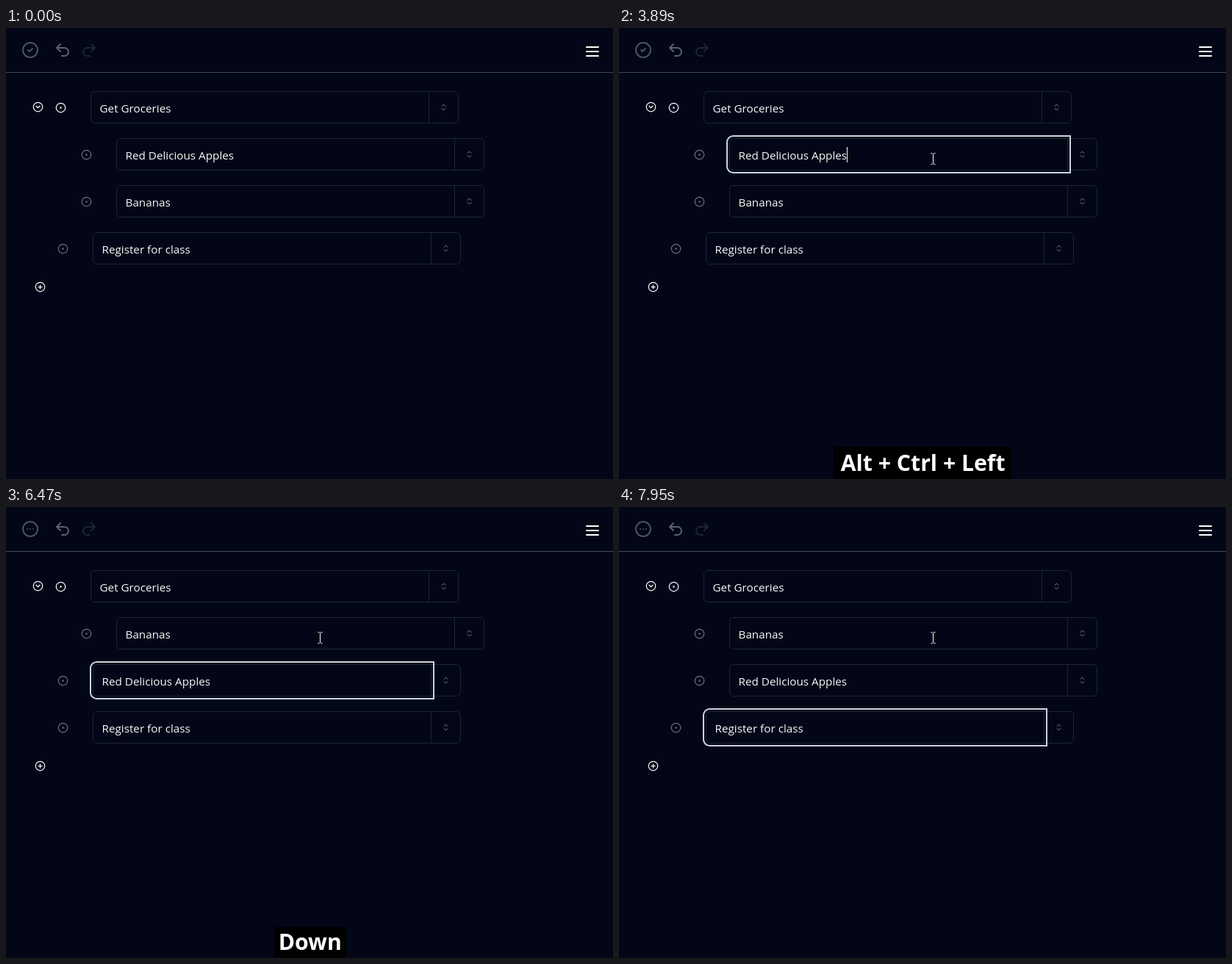
These frames come from a looping animation (826x614 px, 8 s). An HTML page:

```html
<!DOCTYPE html>
<html lang="en">
<head>
<meta charset="utf-8">
<title>Outline list</title>
<style>
  html, body { margin: 0; width: 100%; height: 100%; overflow: hidden; background: #020617; }
  svg { display: block; }
  text { font: 15.25px "Open Sans", "Noto Sans", sans-serif; fill: #f8fafc; white-space: pre; }
  .keys { font-size: 30.2px; font-weight: 700; fill: #fff; text-anchor: middle; }
  .icon { fill: none; stroke-width: 2; stroke-linecap: round; stroke-linejoin: round; }
</style>
</head>
<body>
<svg id="stage" width="826" height="614" viewBox="0 0 826 614"></svg>
<script>
const LOOP = 8000, BG = '#020617', BORDER = '#1e2534', MUTED = '#6b7280', WHITE = '#f8fafc';
const stage = document.getElementById('stage');

// Rows as [text, indented]; the first row is always the parent.
const GROCERIES = 'Get Groceries', APPLES = 'Red Delicious Apples', BANANAS = 'Bananas', CLASS = 'Register for class';
const list = (a, b, indented) => [[GROCERIES], [a, true], [b, indented], [CLASS]];

// Each timeline holds [start, value]; the latest started value applies.
const rowsAt = [[0, list(APPLES, BANANAS, true)], [4020, list(BANANAS, APPLES, false)], [7000, list(BANANAS, APPLES, true)]];
const focusAt = [[0, null], [1430, { row: 1, caret: 310 }], [4020, { row: 1, caret: 221 }],
  [5940, { row: 2, caret: 185 }], [7020, { row: 3, caret: 249 }]];
const savedAt = [[0, true], [4020, false], [4880, true], [5280, false], [6800, true], [7000, false], [7750, true], [7950, false]];
const keysAt = [[0, null],
  [3890, { text: 'Alt + Ctrl + Left', x: 292, w: 242, top: 570, base: 603 }], [4810, null],
  [5880, { text: 'Down', x: 365, w: 98, top: 572, base: 603 }], [6800, null],
  [6870, { text: 'Alt + Ctrl + Right', x: 282, w: 263, top: 564, base: 596 }], [7820, null]];
const current = (line, t) => line.filter(e => e[0] <= t).pop();

const rowX = (row, i) => i === 0 ? 115 : row[1] ? 150 : 118;
const rowY = i => 86 + 64 * i;

// Icons live on a 24-unit grid centred on (cx, cy).
const icon = (cx, cy, size, color, body) =>
  `<g class="icon" stroke="${color}" transform="translate(${cx - size / 2} ${cy - size / 2}) scale(${size / 24})">${body}</g>`;
const path = d => `<path d="${d}"/>`;
const ring = '<circle cx="12" cy="12" r="10"/>';
const dot = ring + '<circle cx="12" cy="12" r="1"/>';
const check = ring + path('m9 12 2 2 4-4');
const ellipsis = ring + path('M8 12h.01M12 12h.01M16 12h.01');
const undo = path('M9 14 4 9l5-5M4 9h10.5a5.5 5.5 0 0 1 0 11H11');
const redo = path('m15 14 5-5-5-5M20 9H9.5a5.5 5.5 0 0 0 0 11H13');
const menu = path('M4 6h16M4 12h16M4 18h16');
const chevrons = path('m7 15 5 5 5-5M7 9l5-5 5 5');

const header = saved =>
  icon(33, 30, 24, '#4b5260', saved ? check : ellipsis) +
  icon(77, 30, 24, '#5b6270', undo) +
  icon(113, 30, 24, '#1f2531', redo) +
  icon(798, 32, 24, '#fff', menu) +
  '<path d="M0 60.5H826" stroke="#414958"/>';

function drawRow(row, i) {
  const x = rowX(row, i), y = rowY(i);
  return icon(i ? x - 40.5 : 74.5, y + 22.5, 15, i ? MUTED : WHITE, dot) +
    `<rect x="${x + .5}" y="${y + .5}" width="500" height="43" rx="5.5" fill="none" stroke="${BORDER}"/>` +
    `<path d="M${x + 460.5} ${y + 1}v42" stroke="${BORDER}"/>` +
    icon(x + 480.5, y + 22, 12, '#7d838d', chevrons) +
    `<text x="${x + 12.5}" y="${y + 29}">${row[0]}</text>`;
}

// Ring around the text field: round on the left, square on the right.
function drawFocus(rows, focus, caretOn) {
  const x = rowX(rows[focus.row], focus.row), y = rowY(focus.row);
  const frame = (out, r) => {
    const w = 461 + 2 * out, h = 44 + 2 * out;
    return `M${x - out + r} ${y - out}h${w - r}v${h}h${r - w}a${r} ${r} 0 0 1 ${-r} ${-r}v${2 * r - h}a${r} ${r} 0 0 1 ${r} ${-r}z`;
  };
  return `<path d="M${x + 612} ${y - 1}v46" stroke="${BG}" stroke-width="2"/>` +
    `<path d="${frame(3, 8.5)}" fill="none" stroke="#cbd5e1" stroke-width="2"/>` +
    (caretOn ? `<rect x="${focus.caret}" y="${y + 12}" width="1" height="21" fill="#fff"/>` : '');
}

const mix = (a, b, u) => a + (b - a) * u;
const bezier = (a, b, c, u) => mix(mix(a, b, u), mix(b, c, u), u);

function drawPointer(t, rows) {
  if (t < 460) return '';
  const step = Math.min(1, (Math.floor((t - 460) / 70) + 1) / 12);
  const u = 1 - (1 - step) ** 2;
  const settle = Math.min(1, Math.max(0, (t - 1230) / 140));
  const x = Math.round(mix(bezier(657, 430, 424, u), 427, settle));
  const y = Math.round(mix(bezier(513, 265, 182, u), 178, settle));
  const overField = rows.some((row, i) => {
    const dx = x - rowX(row, i), dy = y - rowY(i);
    return dx >= 0 && dx < 461 && dy >= 0 && dy < 44;
  });
  return `<g transform="translate(${x} ${y})">` + (overField
    ? '<path d="M-2.5-7.5h2M1.5-7.5h2M.5-7V7M-2.5 7.5h2M1.5 7.5h2" fill="none" stroke="#fff"/>'
    : '<path d="M.5.5v16l3.7-3.6 2.4 5.6 2.3-1-2.4-5.5h5z" fill="#fff" stroke="#000"/>') + '</g>';
}

const drawKeys = k =>
  `<rect x="${k.x}" y="${k.top}" width="${k.w}" height="${614 - k.top}"/>` +
  `<text class="keys" x="413.7" y="${k.base}">${k.text}</text>`;

function render(t) {
  const rows = current(rowsAt, t)[1];
  const [since, focus] = current(focusAt, t);
  const keys = current(keysAt, t)[1];
  const caretOn = Math.floor((t - since) / 530) % 2 === 0;
  return header(current(savedAt, t)[1]) +
    icon(43.5, 107.5, 15, WHITE, ring + path('m16 10-4 4-4-4')) +
    rows.map(drawRow).join('') +
    icon(46.5, 352.5, 15, WHITE, ring + path('M8 12h8M12 8v8')) +
    (focus ? drawFocus(rows, focus, caretOn) : '') +
    drawPointer(t, rows) +
    (keys ? drawKeys(keys) : '');
}

const start = performance.now();
let shown = '';
function tick() {
  const markup = render((performance.now() - start) % LOOP);
  if (markup !== shown) stage.innerHTML = shown = markup;
  requestAnimationFrame(tick);
}
tick();
</script>
</body>
</html>
```
